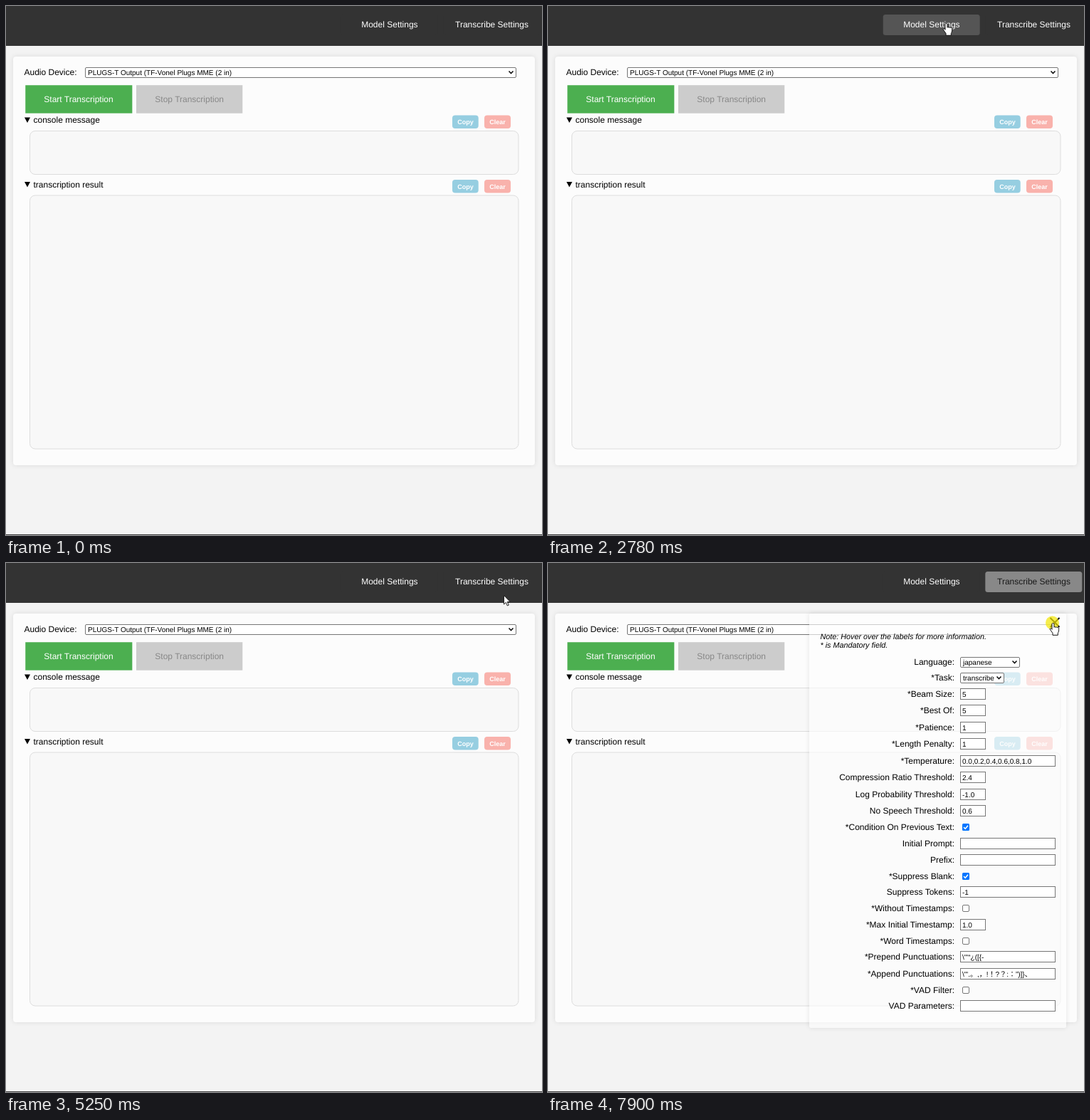
Write an HTML page that moves like this. It is 753 px wide and 743 px high and loops after 8 s.

```html
<!DOCTYPE html>
<html lang="en">
<head>
<meta charset="utf-8">
<title>Transcription panel</title>
<style>
html, body { margin: 0; width: 100%; height: 100%; overflow: hidden; background: #f3f3f3; }
div, svg { position: absolute; }
svg { left: 0; top: 0; font: 12px Arial, "Liberation Sans", "Noto Sans CJK JP", sans-serif; text-rendering: geometricPrecision; }
text { white-space: pre; }
.card { left: 10px; top: 71px; width: 733px; height: 574px; border-radius: 4px; background: #fcfcfc; box-shadow: 0 0 7.5px rgba(0,0,0,.1); }
.modal { left: 367px; top: 71px; width: 361px; overflow: hidden; border-radius: 3px; background: rgba(253,253,253,.64); box-shadow: 0 0 7.5px rgba(0,0,0,.1); }
.modal svg { left: -367px; top: -71px; }
</style>
</head>
<body>
<div class="card"></div>
<svg id="page" width="753" height="743"></svg>
<div class="modal" id="model"></div>
<div class="modal" id="task"></div>
<svg id="top" width="753" height="743">
  <circle id="click" cx="708.5" cy="84" r="9.5" fill="#f2e600" fill-opacity=".7"/>
  <g id="arrow" fill="#fff" stroke="#222" stroke-linejoin="round"><path d="M.5 .5V13L3.3 10.4 5.3 15 7.3 14.1 5.3 9.6H9.2Z"/></g>
  <g id="hand" fill="#fff" stroke="#111" stroke-linejoin="round"><path d="M.5 .5C-.4 .5-1 1.1-1 1.9V9.3L-2.2 8.1C-3 7.3-4.2 8.2-3.8 9.1L0 14.5V17.3H7.3V14.5C8.3 12.8 8.6 11.5 8.6 9.5V7.4C8.6 6 6.8 5.9 6.6 7 6.5 5.6 4.5 5.4 4.3 6.6 4.2 5.3 2.3 5.1 2 6.3V1.9C2 1.1 1.4 .5 .5 .5Z"/></g>
</svg>
<script>
const $ = id => document.getElementById(id);
const esc = s => s.replace(/&/g, '&amp;').replace(/</g, '&lt;');
const text = (x, y, s, attr = '') => `<text x="${x}" y="${y}" ${attr}>${esc(s)}</text>`;
const rect = (x, y, w, h, fill, attr = '') =>
  `<rect x="${x}" y="${y}" width="${w}" height="${h}" fill="${fill}" ${attr}/>`;
const outline = 'stroke="#767676"';
const rounded = outline + ' rx="1.5"';
const mid = 'text-anchor="middle"';

function select(x, c, w, s) {
  return rect(x + .5, c - 6.5, w - 1, 14, '#fff', rounded) + text(x + 4, c + 4, s, 'font-size="10"') +
    `<path d="M${x + w - 10.5} ${c - 1.5}l3 3 3-3" fill="none" stroke="#111" stroke-width="1.6"/>`;
}

function check(c, on) {
  return on
    ? rect(582, c - 5, 10, 10, '#0075ff', 'rx="1.5"') +
      `<path d="M584 ${c}l2.2 2.3 3.8-4.6" fill="none" stroke="#fff" stroke-width="1.5"/>`
    : rect(582.5, c - 4.5, 9, 9, '#fff', rounded);
}

// Field values: true/false is a checkbox; "v" before a width marks a drop-down.
function form(rows) {
  const italic = 'font-size="10.8" font-style="italic"';
  return '<svg width="753" height="743">' +
    text(382.5, 107, 'Note: Hover over the labels for more information.', italic) +
    text(382.5, 119, '* is Mandatory field.', italic) +
    '<path d="M705.5 77l13 13m0-13l-13 13" stroke="#111" stroke-width="2"/>' +
    rows.map(([c, label, value, w = 36]) => text(571, c + 4, label + ':', 'text-anchor="end"') + (
      typeof value == 'boolean' ? check(c, value) :
      w[0] == 'v' ? select(579, c, +w.slice(1), value) :
      rect(579.5, c - 7.5, w - 1, 15, '#fff', outline) + text(582, c + 4, value, 'font-size="10"')
    )).join('') + '</svg>';
}

function pane(y, label, h) {
  const small = 'font-size="9" font-weight="bold" fill="#fff" ' + mid;
  return `<path d="M26 ${y - 3.5}h8l-4 7.5z"/>` + text(38.5, y + 4, label) +
    rect(627, y - 6.5, 36.7, 18.5, '#96cee1', 'rx="4"') + text(645.5, y + 6, 'Copy', small) +
    rect(672, y - 6.5, 37, 18.5, '#f9b2ac', 'rx="4"') + text(690.5, y + 6, 'Clear', small) +
    rect(33.5, y + 15.5, 686.5, h, '#f8f8f8', 'stroke="#ddd" rx="7.5"');
}

const nav = (id, x, label) => `<g id="${id}">` +
  rect(x, 12, 136, 29, '#333', 'rx="3.5"') + text(x + 68.2, 30, label, mid) + '</g>';

$('page').innerHTML = rect(0, 0, 753, 56, '#333') + rect(0, 742, 753, 1, '#444') +
  nav('navModel', 470.7, 'Model Settings') + nav('navTask', 614.3, 'Transcribe Settings') +
  text(25.5, 97, 'Audio Device:') + select(111, 93, 606, 'PLUGS-T Output (TF-Vonel Plugs MME (2 in)') +
  '<g id="start">' + rect(28.1, 112.1, 148.4, 37.7, '#4caf50', 'stroke="#4caf50" stroke-width="1.7"') +
  text(102, 135, 'Start Transcription', mid) + '</g>' +
  rect(183, 111.2, 149.3, 39.5, '#ccc') + text(257.7, 135, 'Stop Transcription', mid + ' fill="#888"') +
  pane(160, 'console message', 61) + pane(250.5, 'transcription result', 356);

$('model').innerHTML = form([
  [139, '*Model Size or Path', 'large-v2', 'v73'],
  [161, '*Device', 'cuda', 'v40'],
  [184, '*Device Index', '0', 134],
  [207, '*Compute Type', 'float16', 'v70'],
  [229, '*CPU Threads', '4'],
  [253, '*Number of Workers', '1'],
  [276, 'Download Root', '', 134],
  [299, '*Local Files Only', false]
]);

$('task').innerHTML = form([
  [139, 'Language', 'japanese', 'v84'],
  [161, '*Task', 'transcribe', 'v62'],
  [184, '*Beam Size', '5'],
  [207, '*Best Of', '5'],
  [231, '*Patience', '1'],
  [254, '*Length Penalty', '1'],
  [278, '*Temperature', '0.0,0.2,0.4,0.6,0.8,1.0', 134],
  [301, 'Compression Ratio Threshold', '2.4'],
  [325, 'Log Probability Threshold', '-1.0'],
  [348, 'No Speech Threshold', '0.6'],
  [371, '*Condition On Previous Text', true],
  [394, 'Initial Prompt', '', 134],
  [417, 'Prefix', '', 134],
  [440, '*Suppress Blank', true],
  [462, 'Suppress Tokens', '-1', 134],
  [485, '*Without Timestamps', false],
  [508, '*Max Initial Timestamp', '1.0'],
  [531, '*Word Timestamps', false],
  [553, '*Prepend Punctuations', '\\"\'“¿([{-', 134],
  [577, '*Append Punctuations', '\\"\'.。,，!！?？:：”)]}、', 134],
  [600, '*VAD Filter', false],
  [622, 'VAD Parameters', '', 134]
]);

const clamp = x => Math.max(0, Math.min(1, x));
const ramp = (t, start, length) => clamp((t - start) / length);
const smooth = u => u * u * (3 - 2 * u);
const mix = (a, b, k) => `color-mix(in srgb, ${b} ${k * 100}%, ${a})`;
const within = (t, spans) => spans.some(([a, b]) => t >= a && t < b);

// Pointer path: time, x, y
const path = [
  [370, 728, 760], [600, 500, 520], [850, 250, 270], [1150, 136, 150], [1290, 119, 136],
  [1780, 119, 136], [1880, 344, 84], [1950, 344, 84], [2050, 470, 50], [2300, 540, 29],
  [2580, 557, 23], [2770, 557, 23], [2780, 559, 24], [3740, 559, 24], [3980, 692, 92],
  [4120, 708, 80], [4960, 708, 78], [5110, 702, 56], [5240, 699, 45], [5310, 699, 45],
  [5530, 703, 36], [6430, 703, 36], [6490, 711, 66], [6680, 716, 93], [7040, 709, 84],
  [8000, 709, 84]
];

function pointer(t) {
  const i = path.findIndex(p => p[0] > t);
  const [t0, x0, y0] = path[i - 1], [t1, x1, y1] = path[i];
  const k = (t - t0) / (t1 - t0);
  return [Math.round(x0 + (x1 - x0) * k), Math.round(y0 + (y1 - y0) * k)];
}

function paintNav(id, hover, open) {
  const [box, label] = $(id).children;
  const g = 51 + 34 * hover + 51 * open;
  box.style.fill = `rgb(${g},${g},${g})`;
  label.style.fill = mix('#fff', '#1a1a1a', open);
}

function paintModal(id, h) {
  $(id).style.display = h > 0 ? '' : 'none';
  $(id).style.height = h + 'px';
}

function draw(t) {
  const k = ramp(t, 1200, 400) - ramp(t, 1895, 400);
  const [box, label] = $('start').children;
  box.style.fill = mix('#4caf50', '#fff', k);
  label.style.fill = mix('#fff', '#4caf50', k);

  const modelOpen = smooth(ramp(t, 2960, 683)) - smooth(ramp(t, 4180, 683));
  const taskOpen = smooth(ramp(t, 5660, 683));
  paintModal('model', Math.min(258, 582 * modelOpen));
  paintModal('task', 582 * taskOpen);
  paintNav('navModel', ramp(t, 2300, 250) - ramp(t, 4180, 300), ramp(t, 2960, 300) - ramp(t, 4180, 300));
  paintNav('navTask', ramp(t, 5290, 250), ramp(t, 5660, 300));

  const hand = within(t, [[1180, 1810], [2380, 3800], [4050, 4700], [5320, 6460], [6950, 8000]]);
  const shown = t >= 400;
  $('hand').style.display = shown && hand ? '' : 'none';
  $('arrow').style.display = shown && !hand ? '' : 'none';
  if (shown) $(hand ? 'hand' : 'arrow').setAttribute('transform', `translate(${pointer(t)})`);
  $('click').style.display = t >= 7900 ? '' : 'none';
}

const begin = performance.now();
function frame() {
  draw((performance.now() - begin) % 8000);
  requestAnimationFrame(frame);
}
frame();
</script>
</body>
</html>
```
